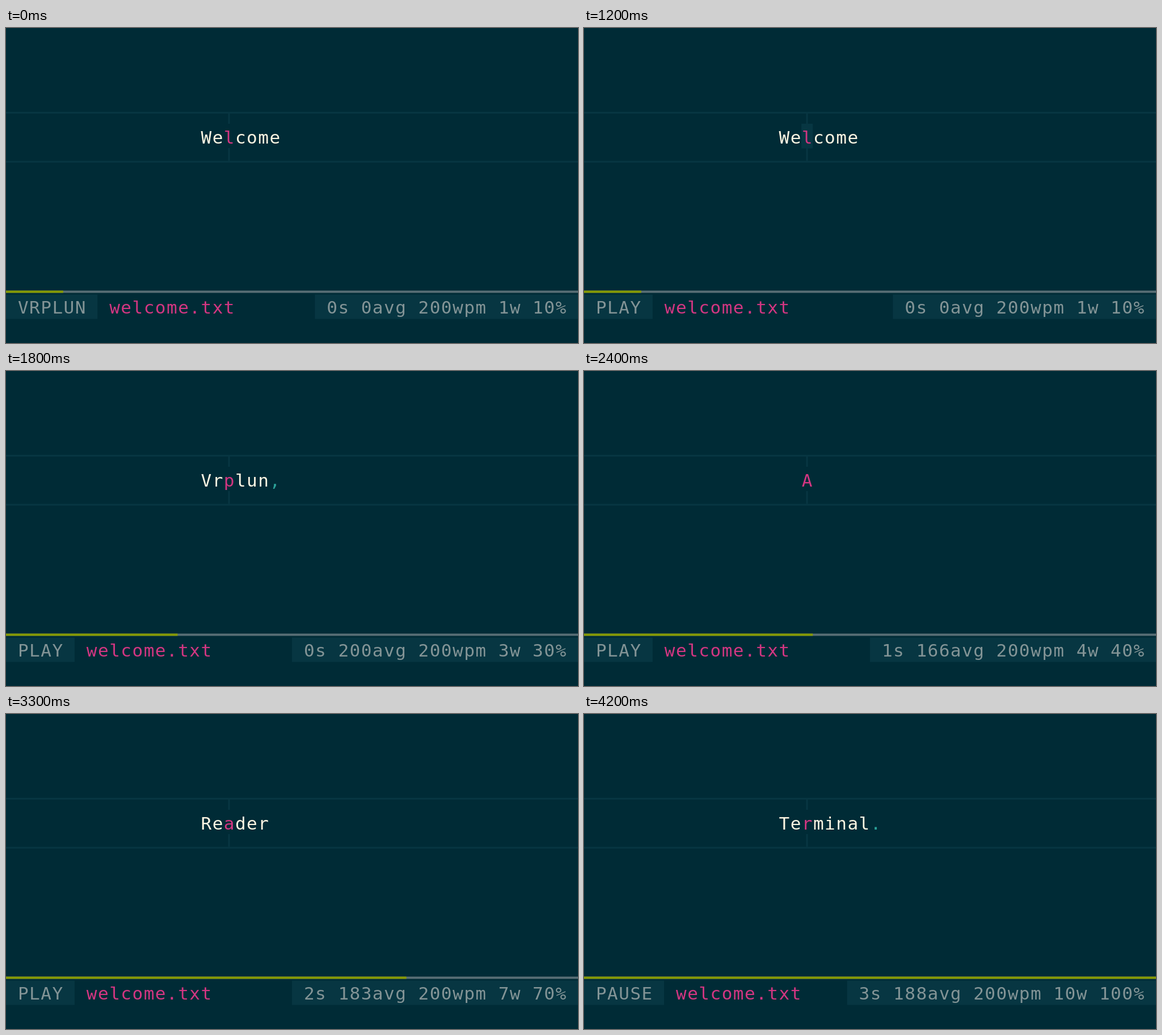
Animation, 1008 px wide and 556 px high, one loop 4800 ms. Source, as an HTML page with a canvas:

```html
<!DOCTYPE html>
<html lang="en">
<head>
<meta charset="utf-8">
<title>Speed reader</title>
<style>
  html, body { margin: 0; width: 100%; height: 100%; overflow: hidden; background: #002b36; }
  canvas { display: block; }
</style>
</head>
<body>
<canvas id="stage" width="1008" height="556"></canvas>
<script>
const ctx = document.getElementById('stage').getContext('2d');
const W = 1008, H = 556, COLS = 50, CELL = W / COLS;
const LOOP = 4800, WPM = 200, FOCUS_COL = 19;
const FILE = 'welcome.txt';

const color = {
  bg: '#002b36', panel: '#073642', text: '#fdf6e3', focus: '#d33682',
  mark: '#2aa198', status: '#839496', done: '#859900', rest: '#586e75'
};

// start time in ms, word, whole seconds read
const words = [
  [0, 'Welcome', 0], [1500, 'To', 0], [1800, 'Vrplun,', 0], [2400, 'A', 1],
  [2700, 'TUI', 1], [3000, 'Text', 2], [3300, 'Reader', 2], [3600, 'For', 2],
  [3900, 'The', 2], [4200, 'Terminal.', 3]
];

function box(fill, x, y, w, h) {
  ctx.fillStyle = fill;
  ctx.fillRect(x, y, w, h);
}

// Writes one character per terminal cell.
function write(text, col, y, paint) {
  [...text].forEach((ch, i) => {
    ctx.fillStyle = typeof paint === 'function' ? paint(ch, i) : paint;
    ctx.fillText(ch, (col + i + 0.5) * CELL, y);
  });
}

function drawWord(word, cursor) {
  const letters = word.replace(/[.,]/g, '').length;
  const focus = letters < 2 ? 0 : letters < 6 ? 1 : 2;

  box(color.panel, 0, 148, W, 3);
  box(color.panel, 0, 234.5, W, 3);
  box(color.panel, 391.5, 151, 3, 18);
  box(color.panel, 391.5, 212, 3, 22.5);
  if (cursor) box(color.panel, FOCUS_COL * CELL, 169, CELL, 43.5);

  write(word, FOCUS_COL - focus, 203.5, (ch, i) =>
    i === focus ? color.focus : /[.,]/.test(ch) ? color.mark : color.text);
}

function drawStatus(label, count, seconds) {
  const share = count / words.length;
  const read = count - 1;
  // The comma costs half a word of average speed.
  const avg = read === 0 ? 0 : read < 3 ? WPM : Math.floor(WPM * (1 - 0.5 / read));
  const stats = `${seconds}s ${avg}avg ${WPM}wpm ${count}w ${Math.round(share * 100)}%`;
  const statsCol = COLS - 1 - stats.length;

  box(color.rest, 0, 463.5, W, 4);
  box(color.done, 0, 463.5, W * share, 4);
  box(color.panel, 0, 470.5, (label.length + 2) * CELL, 43);
  box(color.panel, (statsCol - 1) * CELL, 470.5, W, 43);

  write(label, 1, 504, color.status);
  write(FILE, label.length + 3, 504, color.focus);
  write(stats, statsCol, 504, color.status);
}

function draw(t) {
  const count = words.filter(([start]) => start <= t).length;
  const [, word, seconds] = words[count - 1];
  const label = t < 600 ? 'VRPLUN' : count < words.length ? 'PLAY' : 'PAUSE';

  box(color.bg, 0, 0, W, H);
  ctx.font = '31px "DejaVu Sans Mono", monospace';
  ctx.textAlign = 'center';
  ctx.textBaseline = 'alphabetic';
  drawWord(word, t >= 1200 && t < 1500);
  drawStatus(label, count, seconds);
}

const begin = performance.now();
function tick() {
  draw((performance.now() - begin) % LOOP);
  requestAnimationFrame(tick);
}
tick();
</script>
</body>
</html>
```
